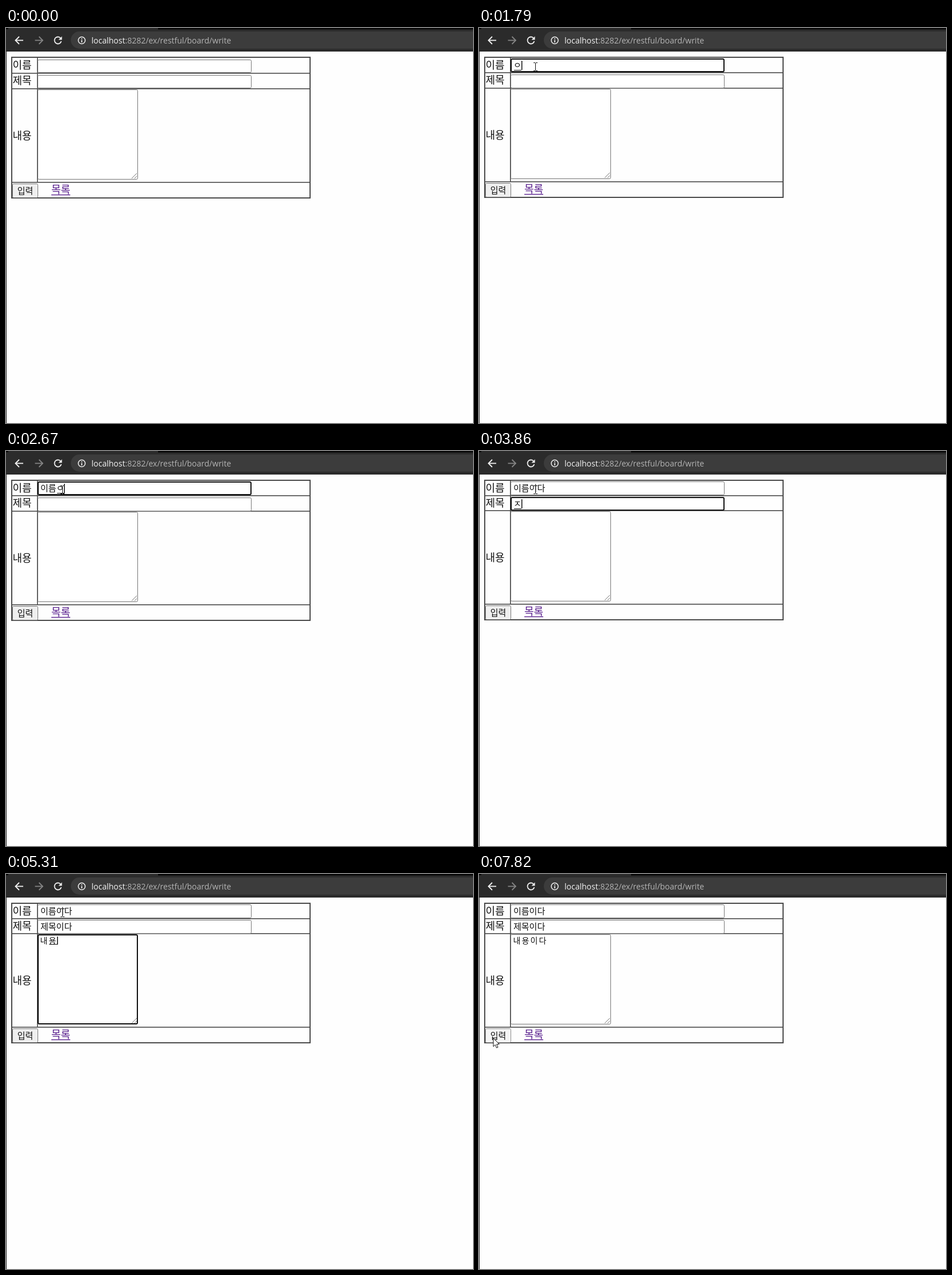
Recreate the animation shown at these times as an HTML page with a canvas. Size 814x688 px, loop 8 s.

```html
<!DOCTYPE html>
<html lang="ko">
<head>
<meta charset="utf-8">
<title>Board form</title>
<style>
  html, body { margin: 0; width: 100%; height: 100%; overflow: hidden; background: #fefefe; }
  canvas { display: block; }
</style>
</head>
<body>
<canvas id="stage" width="814" height="688"></canvas>
<script>
const ctx = document.getElementById('stage').getContext('2d');
const LOOP = 8000, STEP = 98, BLUR = 7130;
const KOREAN = '"Noto Sans CJK KR", "Noto Sans CJK", sans-serif';
const NAME = 0, TITLE = 1, BODY = 2;

// [time, field, text]; an empty text means the field has just taken focus
const edits = [
  [990, NAME, ''], [1790, NAME, 'ㅇ'], [1890, NAME, '이'], [2380, NAME, '이ㄹ'],
  [2480, NAME, '이르'], [2580, NAME, '이름'], [2670, NAME, '이름ㅇ'],
  [2770, NAME, '이름이'], [2870, NAME, '이름읻'], [2970, NAME, '이름이다'],
  [3270, TITLE, ''], [3860, TITLE, 'ㅈ'], [3960, TITLE, '제'], [4060, TITLE, '젬'],
  [4150, TITLE, '제모'], [4250, TITLE, '제목'], [4350, TITLE, '제목이'],
  [4440, TITLE, '제목읻'], [4540, TITLE, '제목이다'],
  [4640, BODY, ''], [4930, BODY, 'ㄴ'], [5030, BODY, '내'], [5120, BODY, '냉'],
  [5220, BODY, '내요'], [5310, BODY, '내용'], [5410, BODY, '내용이'],
  [5510, BODY, '내용읻'], [5600, BODY, '내용이다']
];

// Pointer way points: [time, x, y]
const enterPath = [[200, 525, 534], [390, 440, 250], [590, 260, 9], [790, 130, 45], [980, 100, 66], [1080, 100, 66], [1190, 98, 67]];
const leavePath = [[6100, 98, 67], [6400, 52, 180], [6660, 3, 318], [6860, 14, 342], [6950, 18, 338], [7130, 24, 287], [7230, 25, 286]];

function rect(x, y, w, h, color) {
  ctx.fillStyle = color;
  ctx.fillRect(x, y, w, h);
}

function frame(x, y, w, h, fill, stroke, width = 1) {
  ctx.beginPath();
  ctx.roundRect(x + width / 2, y + width / 2, w - width, h - width, 2);
  ctx.fillStyle = fill;
  ctx.fill();
  ctx.lineWidth = width;
  ctx.strokeStyle = stroke;
  ctx.stroke();
}

function line(points, color, width) {
  ctx.beginPath();
  points.forEach(([x, y]) => ctx.lineTo(x, y));
  ctx.strokeStyle = color;
  ctx.lineWidth = width;
  ctx.stroke();
}

function text(str, x, y, size, color = '#111', family = KOREAN) {
  ctx.font = `${size}px ${family}`;
  ctx.fillStyle = color;
  ctx.fillText(str, x, y);
}

function arrow(x, dir, color) {
  line([[x - 7 * dir, 21.5], [x + 6.5 * dir, 21.5]], color, 1.8);
  line([[x - 0.5 * dir, 15], [x - 7 * dir, 21.5], [x - 0.5 * dir, 28]], color, 1.8);
}

function drawToolbar() {
  rect(0, 0, 814, 41, '#2b2b2b');
  rect(0, 40, 814, 1, '#232323');
  rect(265, 0, 549, 2.5, '#050505');
  rect(0, 0, 4, 2, '#050505');
  ctx.beginPath();
  ctx.roundRect(113, 6, 730, 30, 15);
  ctx.fillStyle = '#3c3c3c';
  ctx.fill();

  arrow(23.5, 1, '#f1f1f1');
  arrow(57, -1, '#858585');

  ctx.strokeStyle = '#f1f1f1';
  ctx.lineWidth = 1.8;
  ctx.beginPath();
  ctx.arc(90.5, 21.5, 6, 0.25, 5.5);
  ctx.stroke();
  ctx.beginPath();
  ctx.moveTo(97.5, 14.5);
  ctx.lineTo(97.5, 20.5);
  ctx.lineTo(91.5, 20.5);
  ctx.fillStyle = '#f1f1f1';
  ctx.fill();

  ctx.lineWidth = 1.5;
  ctx.beginPath();
  ctx.arc(132, 21.5, 6, 0, 7);
  ctx.stroke();
  rect(131.2, 18, 1.7, 1.7, '#f1f1f1');
  rect(131.2, 21, 1.7, 4, '#f1f1f1');

  const font = '"Open Sans", sans-serif';
  text('localhost', 149, 27, 14, '#f5f5f5', font);
  const hostWidth = ctx.measureText('localhost').width;
  text(':8282/ex/restful/board/write', 149 + hostWidth, 27, 14, '#b4b4b4', font);
}

function drawIBeam(x, y) {
  rect(x, y - 6, 1, 13, '#111');
  for (const edge of [y - 7, y + 7]) {
    rect(x - 3, edge, 3, 1, '#111');
    rect(x + 1, edge, 3, 1, '#111');
  }
}

function drawPointer(x, y) {
  ctx.beginPath();
  [[0, 0], [0, 14.5], [3.3, 11.4], [5.6, 16.8], [8, 15.8], [5.8, 10.5], [10.3, 10.3]]
    .forEach(([dx, dy]) => ctx.lineTo(x + dx, y + dy));
  ctx.closePath();
  ctx.fillStyle = '#fff';
  ctx.fill();
  ctx.strokeStyle = '#111';
  ctx.lineWidth = 1;
  ctx.stroke();
}

// The pointer is sampled at a fixed step, as a screen recording does
function along(path, t) {
  const start = path[0][0], end = path.at(-1)[0];
  const time = t >= end ? end : start + Math.floor((t - start) / STEP) * STEP;
  const i = Math.max(1, path.findIndex(p => p[0] >= time));
  const [t0, x0, y0] = path[i - 1], [t1, x1, y1] = path[i];
  const k = (time - t0) / (t1 - t0);
  return [Math.round(x0 + (x1 - x0) * k), Math.round(y0 + (y1 - y0) * k)];
}

function drawCursor(t) {
  if (t < 200) return;
  const [x, y] = along(t < 6100 ? enterPath : leavePath, t);
  const overField = x > 55 && (y > 53 && y < 104 && x < 428 || y >= 104 && y < 263 && x < 230);
  (overField ? drawIBeam : drawPointer)(x, y);
}

function drawField(index, y, h, values, active, caretOn) {
  const isBody = index === BODY;
  const focused = active === index;
  const value = values[index];
  const x = isBody ? 59 : 60, advance = isBody ? 15 : 13.8;
  const w = isBody ? 175 : 373;
  const top = isBody ? y + 4 : y + (value ? 4 : 3);

  frame(55, y, w, h, '#fff', focused ? '#101010' : '#767676', focused ? 2 : 1);
  if (isBody) {
    line([[219, y + h - 2], [228, y + h - 11]], '#777', 1);
    line([[224, y + h - 2], [228, y + h - 6]], '#777', 1);
  }
  [...value].forEach((ch, i) =>
    text(ch, x + i * advance + (isBody ? 0.5 : 0), y + (isBody ? 16 : 17), isBody ? 14 : 15));

  if (!focused) return;
  const end = x + value.length * advance;
  if (value) rect(Math.round(end - advance) + 1, top + (isBody ? 13 : 16), advance - 1, 1, '#111');
  if (caretOn) rect(Math.round(end), top, 1.4, isBody ? 14 : 16, '#000');
}

function draw(t) {
  const values = ['', '', ''];
  let active = -1, lastEdit = 0;
  for (const [time, field, value] of edits) {
    if (time > t) break;
    values[field] = value;
    active = field;
    lastEdit = time;
  }
  if (t >= BLUR) active = -1;
  const caretOn = (t - lastEdit) % 1000 < 500;

  // Each filled single-line input makes its row one pixel lower
  const shift1 = values[NAME] ? 1 : 0;
  const shift2 = shift1 + (values[TITLE] ? 1 : 0);

  rect(0, 0, 814, 688, '#fefefe');
  drawToolbar();
  rect(0, 41, 1, 647, '#222');

  const border = '#4a4a4a';
  const bottom = 296 - shift2;
  for (const y of [50, 78 - shift1, 105 - shift2, 268 - shift2, bottom - 1])
    rect(9, y, 522, y === 50 || y === bottom - 1 ? 2 : 1.6, border);
  for (const x of [9, 529]) rect(x, 50, 2, bottom - 49, border);
  rect(54, 50, 1.6, 219 - shift2, border);

  text('이름', 11.5, 70.5, 18);
  text('제목', 11.5, 98 - shift1, 18);
  text('내용', 11.5, 193.5 - shift2, 18);

  drawField(NAME, shift1 ? 53 : 55, 23 + shift1, values, active, caretOn);
  drawField(TITLE, 82 - shift2, 23 + shift1, values, active, caretOn);
  drawField(BODY, 107 - shift2, 157, values, active, caretOn);

  const pressed = t >= 7820 || t >= BLUR && t < 7230;
  const hovered = t >= BLUR;
  const face = pressed ? '#f5f5f5' : hovered ? '#e5e5e5' : '#efefef';
  const edge = pressed ? '#8d8d8d' : hovered ? '#4f4f4f' : '#767676';
  frame(11, 271 - shift2, 45, 25, face, edge);
  text('입력', 19.8, 288.5 - shift2, 15);
  text('목록', 79, 287.5 - shift2, 18, '#551a8b');
  rect(79, 290 - shift2, 33, 1.3, '#551a8b');

  drawCursor(t);
}

const begin = performance.now();
function tick() {
  draw((performance.now() - begin) % LOOP);
  requestAnimationFrame(tick);
}
tick();
</script>
</body>
</html>
```
